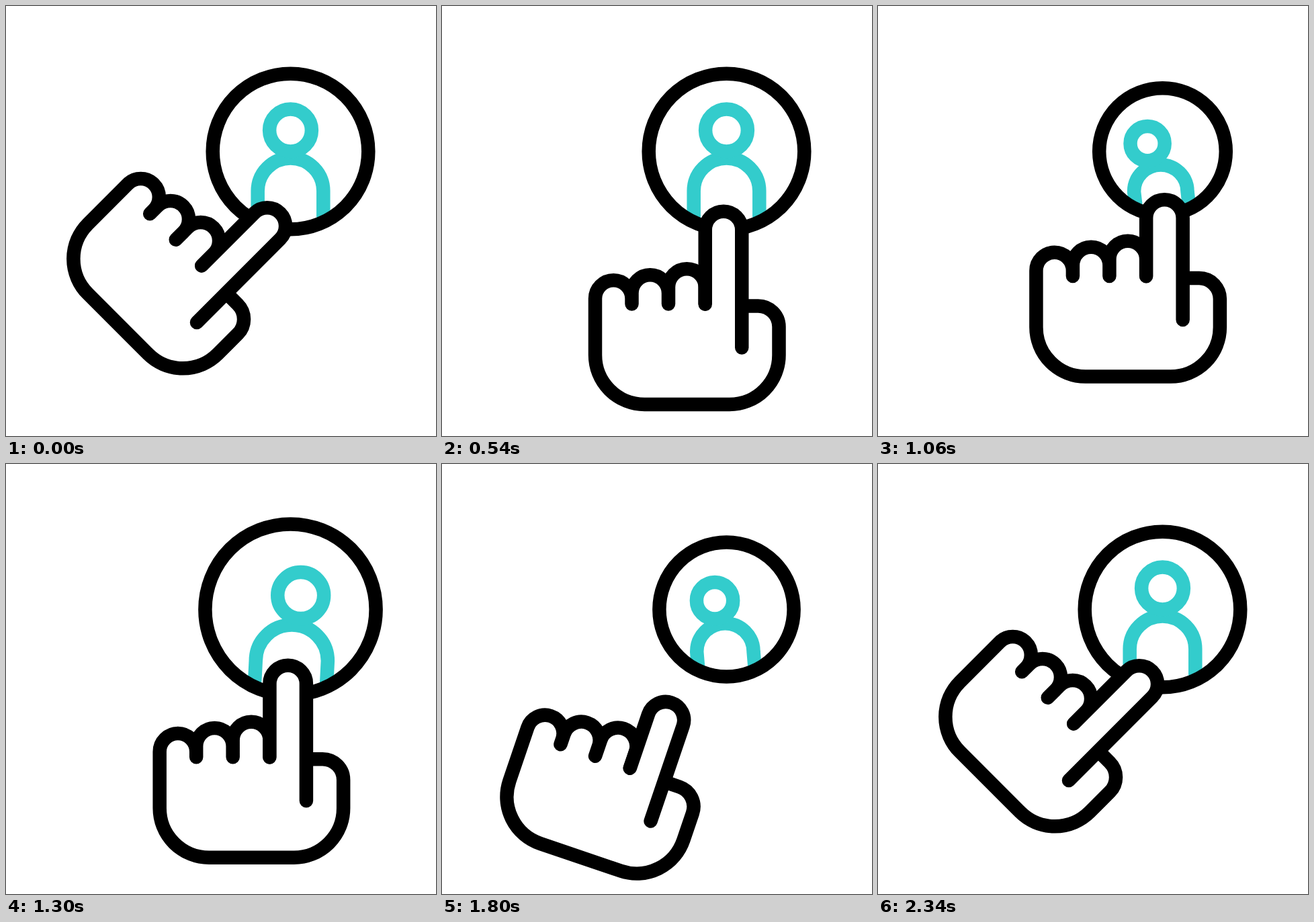
Animation, 640 px wide and 640 px high, one loop 2.4 s. Source, as an HTML page:

```html
<!DOCTYPE html>
<html lang="en">
<head>
<meta charset="utf-8">
<title>Tap on profile</title>
<style>
  html, body { margin: 0; width: 100%; height: 100%; overflow: hidden; background: #fff; }
  svg { display: block; width: 100%; height: 100%; }
  svg * { stroke-width: 20.5; stroke-linejoin: round; }
  .person { fill: none; stroke: #33cccc; }
  .ring { fill: none; stroke: #000; }
  .hand { fill: #fff; stroke: #000; stroke-linecap: round; }
</style>
</head>
<body>
<svg viewBox="0 0 640 640">
  <path class="person" id="body"/>
  <circle class="person" id="head"/>
  <circle class="ring" id="ring" cx="423.5" cy="216.5"/>
  <g class="hand" id="hand">
    <path d="M27.25 113.5H51.5A31 31 0 0 1 82.5 144.5V186.5A73.5 73.5 0 0 1 9 260
      H-117.5A73.5 73.5 0 0 1 -191 186.5V102.5A27.25 27.25 0 0 1 -136.5 102.5V110.5V94.5
      A27.25 27.25 0 0 1 -82 94.5V110.5V85.5A27.25 27.25 0 0 1 -27.25 85.5V110.5"/>
    <path id="index"/>
  </g>
</svg>
<script>
const LOOP = 2400, STEP = 20;
const CX = 423.5, CY = 216.5, RADIUS = 115.8;
const PIVOT = [-42, 143];
const $ = id => document.getElementById(id);
const [body, head, ring, hand, index] = ['body', 'head', 'ring', 'hand', 'index'].map($);

const smooth = t => t * t * (3 - 2 * t);
const early = t => smooth(Math.pow(t, 0.825));

// Each step: time, value, easing into it (smooth by default)
const pose = {
  x: [[200, 258], [540, 377, early], [700, 377], [1000, 385], [1365, 377], [1830, 254], [2300, 258]],
  y: [[200, 399], [540, 476, early], [700, 476], [1000, 432], [1405, 476], [1830, 478.5], [2300, 399]],
  angle: [[200, 45], [540, 0, early], [1400, 0], [2300, 45]],
  bend: [[700, 0], [1000, 26], [1350, 0], [1720, 26], [1830, 26], [2300, 0]]
};

// The ring and the person swing between a small and a large pose
const swing = (rest, small, large) => [
  [700, rest], [1058, small], [1412, large], [1450, large], [1905, small], [2300, rest]
];
const face = {
  grow: swing(0, -21.5, 21.5),
  sway: swing(0, -27.5, 26.7),
  duck: swing(0, 17, 11),
  sink: swing(0, 14.5, 9.8)
};

function at(track, t) {
  if (t <= track[0][0]) return track[0][1];
  for (let i = 1; i < track.length; i++) {
    const [t0, a] = track[i - 1], [t1, b, ease = smooth] = track[i];
    if (t <= t1) return a + (b - a) * ease((t - t0) / (t1 - t0));
  }
  return track[track.length - 1][1];
}

function set(el, attrs) {
  for (const k in attrs) el.setAttribute(k, attrs[k]);
}

function drawFace(t) {
  const r = RADIUS + at(face.grow, t), k = r / RADIUS;
  const sway = at(face.sway, t);
  const px = x => CX + x * k, py = y => CY + y * k;
  set(ring, { r });
  set(head, { cx: px(sway), cy: py(-31.5 + at(face.duck, t)), r: 31.4 * k });
  const w = 48.8, lean = sway * 0.12, shoulder = py(58.8 + at(face.sink, t)), foot = py(102);
  set(body, {
    d: `M${px(-w)} ${foot}L${px(lean - w)} ${shoulder}` +
       `A${w * k} ${w * k} 0 0 1 ${px(lean + w)} ${shoulder}L${px(w)} ${foot}`
  });
}

function drawHand(t) {
  const tip = at(pose.bend, t);
  set(index, { d: `M-27.25 110.75V${tip}A27.25 27.25 0 0 1 27.25 ${tip}V175.5` });
  set(hand, {
    transform: `translate(${at(pose.x, t)} ${at(pose.y, t)}) rotate(${at(pose.angle, t)}) ` +
               `translate(${-PIVOT[0]} ${-PIVOT[1]})`
  });
}

let start = null;
function tick(now) {
  if (start === null) start = now;
  const t = Math.floor(((now - start) % LOOP) / STEP) * STEP;
  drawFace(t);
  drawHand(t);
  requestAnimationFrame(tick);
}
drawFace(0);
drawHand(0);
requestAnimationFrame(tick);
</script>
</body>
</html>
```
